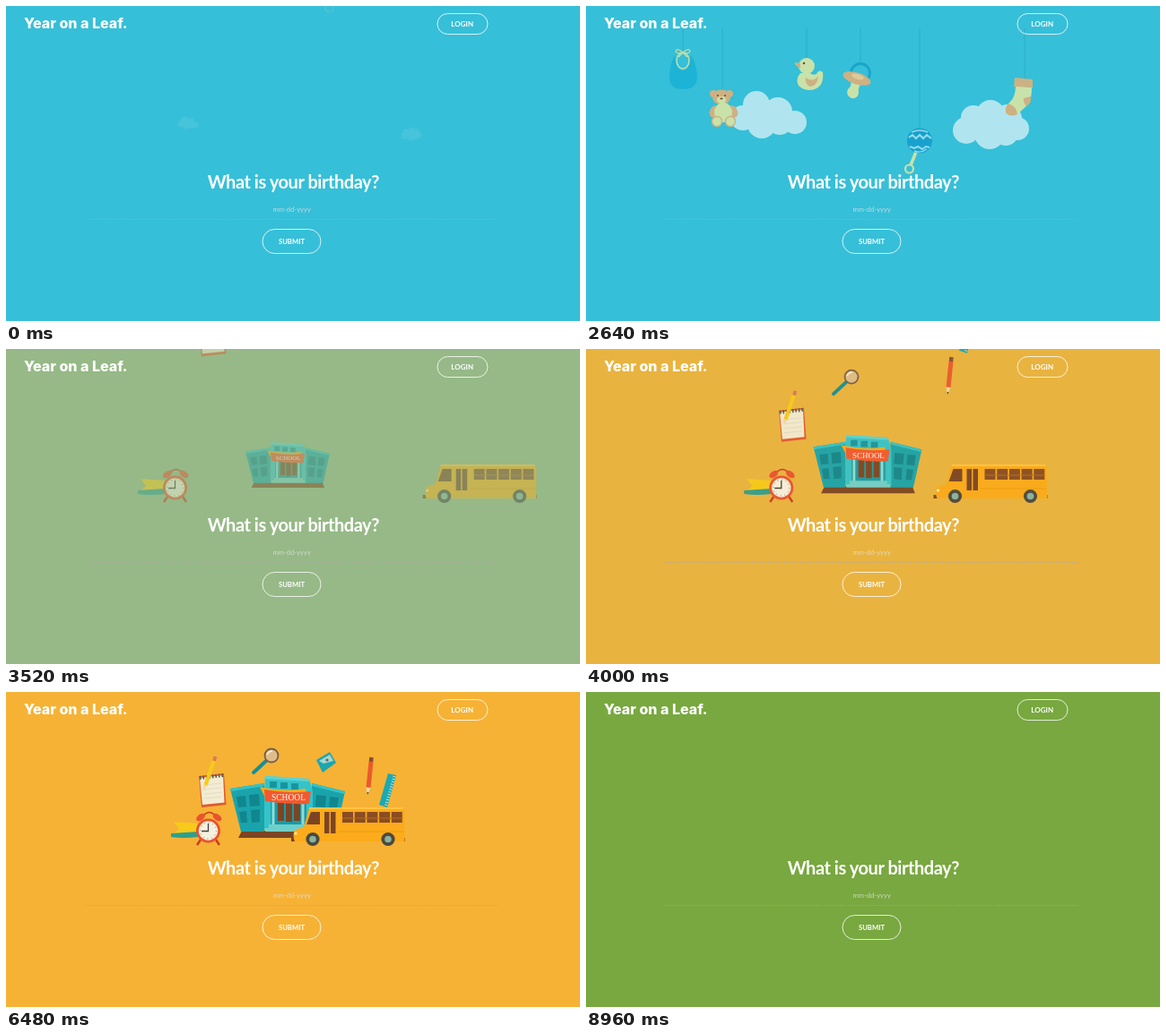
An HTML page that plays this animation: 640 px wide and 352 px high, repeating every 9040 ms.

```html
<!DOCTYPE html>
<html lang="en">
<head>
<meta charset="utf-8">
<title>Birthday</title>
<style>
  html, body { margin: 0; width: 100%; height: 100%; overflow: hidden; background: #36bfd8; }
  svg { display: block; width: 100vw; height: 100vh; }
  text { font-family: Lato, sans-serif; fill: #fff; }
  .mid { text-anchor: middle; }
  .btn { fill: none; stroke: #fff; stroke-opacity: .8; }
  .string { stroke: #2dabc2; stroke-width: .8; }
  .cream { fill: #c9e2a9; }
  .tan { fill: #cdb183; }
  .dark { fill: #7b4524; }
</style>
</head>
<body>
<svg viewBox="0 0 640 352" preserveAspectRatio="none">
  <rect id="bg" width="640" height="352"/>

  <g id="baby">
    <g id="cloudL" fill="#b0e5f0">
      <circle cx="175" cy="125" r="14"/><circle cx="190" cy="110" r="15"/>
      <circle cx="214" cy="118" r="16"/><circle cx="233" cy="130" r="13"/>
      <circle cx="196" cy="132" r="16"/><circle cx="216" cy="130" r="14"/>
    </g>
    <g id="cloudR" fill="#b0e5f0">
      <circle cx="424" cy="139" r="15"/><circle cx="432" cy="125" r="14"/>
      <circle cx="451" cy="121" r="16"/><circle cx="470" cy="126" r="16"/>
      <circle cx="481" cy="137" r="13"/><circle cx="450" cy="143" r="17"/>
      <circle cx="468" cy="142" r="14"/>
    </g>
    <g id="bib">
      <path class="string" d="M108 25V50"/>
      <path d="M99 55Q101 73 108 72Q115 73 117 55Q124 66 124 80Q123 93 108 93Q93 93 93 80Q93 66 99 55Z" fill="#1cb3d6"/>
      <ellipse cx="108" cy="61" rx="7" ry="9" fill="none" stroke="#c9e2a9" stroke-width="1.4"/>
      <path d="M108 52Q101 46 100 51Q102 54 108 52Q115 46 116 51Q114 54 108 52L103 57M108 52L113 57" fill="none" stroke="#c9e2a9" stroke-width="1.2"/>
    </g>
    <g id="bear">
      <path class="string" d="M152 25V94"/>
      <g class="tan">
        <circle cx="142" cy="98" r="4"/><circle cx="160" cy="98" r="4"/>
        <ellipse cx="143" cy="118" rx="5" ry="7" transform="rotate(25 143 118)"/>
        <ellipse cx="164" cy="118" rx="5" ry="7" transform="rotate(-25 164 118)"/>
        <ellipse cx="151" cy="102" rx="10" ry="8.5"/>
      </g>
      <ellipse class="cream" cx="153" cy="119" rx="10" ry="11"/>
      <g fill="#c9e2a9" stroke="#cdb183" stroke-width="1.4">
        <circle cx="146" cy="129" r="5.5"/><circle cx="161" cy="129" r="5.5"/>
      </g>
      <ellipse class="cream" cx="151" cy="105" rx="5" ry="4"/>
      <g class="dark"><circle cx="147" cy="100" r="1"/><circle cx="155" cy="100" r="1"/><ellipse cx="151" cy="103.5" rx="1.6" ry="1.1"/></g>
    </g>
    <g id="duck">
      <path class="string" d="M246 25V60"/>
      <path class="cream" d="M239 75Q233 82 237 89Q244 96 255 93Q266 89 264 74Q260 70 257 76Q253 78 250 75Z"/>
      <circle class="cream" cx="246" cy="67" r="9"/>
      <path class="tan" d="M239 64L233 63Q232 67 239 69ZM245 80Q253 86 259 78Q258 90 250 90Q244 88 245 80Z"/>
      <circle class="dark" cx="243" cy="64" r="1.2"/>
    </g>
    <g id="pacifier">
      <path class="string" d="M306 25V64"/>
      <circle cx="306" cy="75" r="10.5" fill="none" stroke="#18a5ca" stroke-width="2.8"/>
      <path class="cream" d="M295 83Q297 89 292 93Q289 100 296 103Q303 104 304 97Q303 91 307 87Z"/>
      <ellipse class="tan" cx="302" cy="81" rx="16" ry="6.5" transform="rotate(17 302 81)"/>
      <ellipse cx="303" cy="79" rx="7" ry="3" fill="#ddca9b" transform="rotate(17 303 79)"/>
    </g>
    <g id="rattle">
      <path class="string" d="M372 25V137"/>
      <path d="M368 163L362 178" stroke="#c9e2a9" stroke-width="3.5"/>
      <circle cx="360.5" cy="182" r="4.5" fill="none" stroke="#c9e2a9" stroke-width="2.2"/>
      <circle cx="372" cy="150.5" r="14" fill="#18a1cf"/>
      <g fill="none" stroke="#93dcec" stroke-width="2">
        <path d="M360 147l4-3 4 4 4-4 4 4 4-4 5 4M361 157l5 2 4-2 5 3 4-3 4 1"/>
        <path d="M363 141Q372 137 381 141M366 162Q373 165 380 160" stroke-width="1.4"/>
      </g>
    </g>
    <g id="sock">
      <path class="string" d="M489 25V82"/>
      <path class="cream" d="M479 89L497 91Q497 105 493 110L480 122Q473 125 468 119Q466 113 473 107Q479 101 479 89Z"/>
      <path class="tan" d="M478 80L498 82L498 91L477 90ZM496 101Q497 109 491 112Q487 107 488 103ZM471 109Q480 112 481 121Q473 125 468 119Q467 113 471 109Z"/>
    </g>
  </g>

  <g id="school">
    <g id="house">
      <path class="dark" d="M263 155H367L370 163H259Z"/>
      <path d="M250 108L288 102V156H262Z" fill="#1aa3ab"/>
      <path d="M341 102L378 111L368 156H340Z" fill="#1aa3ab"/>
      <path d="M250 108L288 102V105L251 111ZM341 102L378 111L377 114L341 105Z" fill="#33c2c8"/>
      <g fill="#10868f">
        <path id="pane" d="M257 117l10-1 1 12-9 1ZM271 115l11-1 1 13-11 1ZM260 134l8-1 1 13-7 0ZM273 132l10-1 0 14-9 1Z"/>
        <use href="#pane" transform="matrix(-1 0 0 1 628 1)"/>
      </g>
      <path d="M289 95L338 97L342 111V153H288V111Z" fill="#35c3c9"/>
      <path d="M289 93.500L338 97V100L288 97Z" fill="#5bd3d6"/>
      <path d="M294 100h8v7h-8zM306 101h8v7h-8zM318 102h8v7h-8z" fill="#18949f"/>
      <path d="M295 122H335V152H295Z" fill="#1b9aa6"/>
      <path class="dark" d="M303 123h7v21h-7zM312 123h7v22h-7zM321 123h7v21h-7z"/>
      <path d="M298 122v29M331 122v29" stroke="#8fdcd8" stroke-width="3"/>
      <path d="M293 148H337V152H341V156H289V152H293Z" fill="#6fcfca"/>
      <path d="M283 106Q308 112 334 108L337 121L291 122Z" fill="#f9ab19"/>
      <path d="M288 109Q314 114 340 111L338 125Q313 126 289 122Z" fill="#f2592f"/>
      <text class="mid" x="315" y="121" style="font: 9.5px 'Liberation Serif', serif">SCHOOL</text>
    </g>
    <g id="clock">
      <path d="M187 145L214 147V159H186L193 153Z" fill="#f7ca1b"/>
      <path d="M184 158L214 156V162Q198 164 184 162Z" fill="#2f9f8c"/>
      <path d="M217 165l-4 6M234 165l4 6" stroke="#c93e25" stroke-width="2.5"/>
      <path d="M220 138Q227 131 233 138" fill="none" stroke="#c93e25" stroke-width="1.4"/>
      <g fill="#ea5230">
        <ellipse cx="217" cy="140" rx="5.5" ry="3.3" transform="rotate(-35 217 140)"/>
        <ellipse cx="235.5" cy="140" rx="5.5" ry="3.3" transform="rotate(35 235.5 140)"/>
        <circle cx="225.5" cy="155" r="13.5"/>
      </g>
      <circle cx="225.5" cy="155" r="10.7" fill="#f6f1df"/>
      <path d="M225.5 147V155.500H218" fill="none" stroke="#44413c" stroke-width="1.3"/>
      <circle cx="225.5" cy="155" r="9" fill="none" stroke="#77756b" stroke-dasharray="1 3.71"/>
    </g>
    <g id="pad">
      <path d="M215 94L243 91L245.5 126L218 129Z" fill="#e05a30"/>
      <path d="M216 96L242 93L243.5 123.500L219 126Z" fill="#f3ecd2"/>
      <path d="M216 96L242 93" stroke="#4b5b50" stroke-width="4" stroke-dasharray="1.5 2"/>
      <path d="M220 104l20-2M220 109l20-2M221 114l20-2M221 119l20-2" stroke="#d8d4c4" stroke-width=".7"/>
      <path d="M232 76L222.500 104" stroke="#f7ca1b" stroke-width="4.2"/>
      <path d="M220.500 103L224.500 105L220 110Z" fill="#efd8a7"/>
      <path d="M233.5 72L232 77" stroke="#d87a5a" stroke-width="3.8"/>
    </g>
    <g id="lens">
      <path d="M290 77L276 90" stroke="#148f98" stroke-width="4" stroke-linecap="round"/>
      <circle cx="296" cy="71" r="7.5" fill="#dfbd8a" stroke="#755e4b" stroke-width="1.800"/>
      <path d="M291 70q2-4 6-4" fill="none" stroke="#fbefd4" stroke-width="1.5"/>
    </g>
    <g id="sharp">
      <path d="M346 76L361 67L368 79L353 90Z" fill="#1ba6b0"/>
      <path d="M349 77L361 70L365 77L354 80Z" fill="#a8d6cd"/>
      <circle cx="358" cy="76" r="1.6" fill="#60665f"/>
    </g>
    <g id="pencil">
      <path d="M407 78L404 107" stroke="#ea5a2c" stroke-width="5"/>
      <path d="M401.500 106.500L406.500 107L403 115Z" fill="#efd8a7"/>
      <path d="M402.5 112h2l-1.5 3z" fill="#4a4038"/>
      <path d="M407.5 73L407 78" stroke="#85503c" stroke-width="4.5"/>
    </g>
    <g id="ruler">
      <path d="M426 91L435 93L425 129L416 126Z" fill="#1ba9b3"/>
      <path d="M433 94L423.5 127" stroke="#c8e5d5" stroke-width="3" stroke-dasharray="1 2"/>
    </g>
    <g id="bus">
      <path class="dark" d="M318 163h10v4h-10zM432 163h13v4h-13z"/>
      <path d="M340 129H440Q444.500 129 444.500 134V167H322Q319 160 322 154L332 151L337 133Q338 129 340 129Z" fill="#fbab1b"/>
      <path d="M370 156H444" stroke="#e8980f" stroke-width=".8"/>
      <path d="M338 130H443" stroke="#ffc341" stroke-width="2"/>
      <path class="dark" d="M340 134H350V148H335ZM355 134h5.5v24h-5.500zM362 134h5.5v24h-5.500z"/>
      <path d="M375 140H442" stroke="#8a4c22" stroke-width="12" stroke-dasharray="12 1.7"/>
      <path d="M375 141H442" stroke="#b36c25"/>
      <circle cx="323" cy="158" r="1.6" fill="#fff0bd"/>
      <g fill="#87b3a2" stroke="#4b483d" stroke-width="3.8">
        <circle cx="342" cy="164.5" r="5.7"/><circle cx="426" cy="164.5" r="5.7"/>
      </g>
    </g>
  </g>

  <text x="20" y="25" style="font: 800 16px Inter, sans-serif">Year on a Leaf.</text>
  <rect class="btn" x="481" y="8.5" width="56" height="23" rx="11.5"/>
  <text class="mid" x="508.7" y="22.7" font-size="8" font-weight="700">LOGIN</text>
  <text class="mid" x="320.3" y="203.5" font-size="20" font-weight="700" letter-spacing="-.45">What is your birthday?</text>
  <text class="mid" x="318.7" y="230" font-size="7.6" style="fill: #dedede" opacity=".85">mm-dd-yyyy</text>
  <path d="M88 238.5H550" stroke="#a9a9a0" stroke-opacity=".6" stroke-dasharray="2 1"/>
  <rect class="btn" x="286" y="249.5" width="65" height="27" rx="13.5"/>
  <text class="mid" x="318.5" y="265.7" font-size="7.7" font-weight="700">SUBMIT</text>
</svg>
<script>
const LOOP = 9040, STEP = 80;
const BLUE = [54, 191, 216], YELLOW = [246, 178, 53], GREEN = [120, 168, 63];
const el = id => document.getElementById(id);
const clamp = v => Math.max(0, Math.min(1, v));
const mix = (a, b, k) => a.map((v, i) => v + (b[i] - v) * k);

// cubic-bezier(.25, .1, .25, 1)
function ease(x) {
  x = clamp(x);
  const curve = (s, a, b) => 3 * (1 - s) * (1 - s) * s * a + 3 * (1 - s) * s * s * b + s * s * s;
  let lo = 0, hi = 1;
  for (let i = 0; i < 20; i++) {
    const s = (lo + hi) / 2;
    if (curve(s, .25, .25) < x) lo = s; else hi = s;
  }
  return curve(lo, .1, 1);
}

// share of the entrance still to go
const left = (t, start, time = 1500, power = 3) => (1 - clamp((t - start) / time)) ** power;

// [id, start, drop height]
const drops = [
  ['bib', -60, -240], ['bear', -20, -250], ['duck', -90, -240],
  ['pacifier', 0, -240], ['rattle', -150, -247], ['sock', -50, -250],
  ['pad', 3200, -248], ['lens', 3300, -263], ['sharp', 3500, -330],
  ['pencil', 3400, -296], ['ruler', 3600, -315]
];
// [id, start, pivot x, pivot y, growth]
const grows = [
  ['cloudL', -150, 203, 134, 1], ['cloudR', -150, 452, 147, 1], ['house', 3200, 314, 133, .55]
];
// [id, start, distance, time, power]
const slides = [['clock', 3200, -76, 1500, 3], ['bus', 3200, 214, 1860, 2]];

const move = (id, x, y) => el(id).setAttribute('transform', `translate(${x} ${y})`);

function scene(id, shown, gone) {
  el(id).setAttribute('opacity', shown * (1 - gone));
  move(id, 0, -20 * gone);
}

function draw(t) {
  const warm = ease((t - 3160) / 1230), fresh = ease((t - 6550) / 950);
  const color = mix(mix(BLUE, YELLOW, warm), GREEN, fresh);
  el('bg').setAttribute('fill', `rgb(${color.map(Math.round)})`);
  scene('baby', ease((t + 150) / 1200), ease((t - 2880) / 550));
  scene('school', ease((t - 3200) / 1150), ease((t - 6500) / 850));
  for (const [id, start, h] of drops) move(id, 0, h * left(t, start));
  for (const [id, start, d, time, power] of slides) move(id, d * left(t, start, time, power), 0);
  for (const [id, start, x, y, k] of grows) {
    const s = 1 - k * left(t, start);
    el(id).setAttribute('transform', `translate(${x} ${y}) scale(${s}) translate(${-x} ${-y})`);
  }
}

const begin = performance.now();
function tick() {
  const t = (performance.now() - begin) % LOOP;
  draw(Math.floor(t / STEP) * STEP);
  requestAnimationFrame(tick);
}
tick();
</script>
</body>
</html>
```
